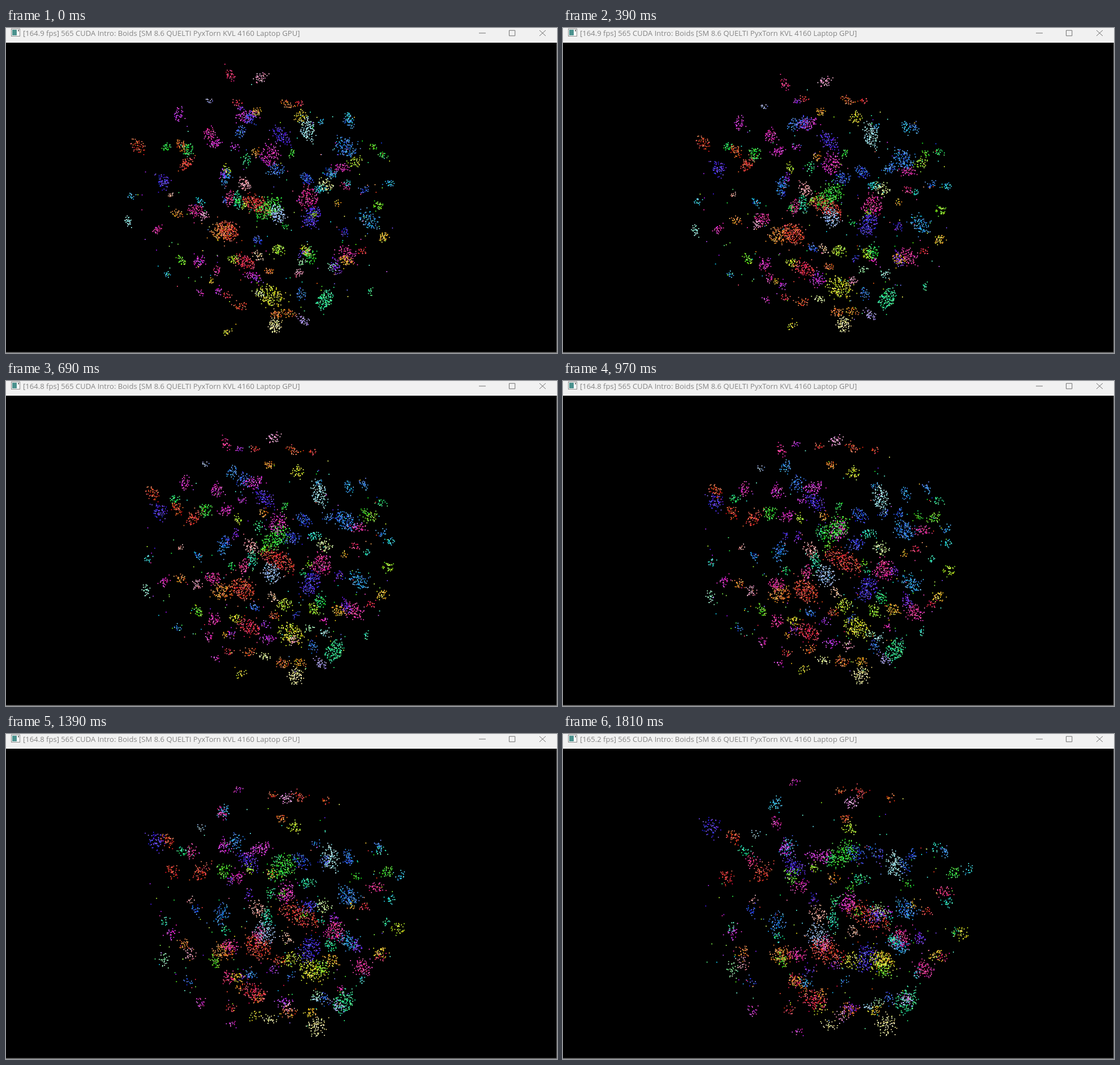
Recreate the animation shown at these times as an HTML page with a canvas. Size 974x575 px, loop 1.83 s.

```html
<!DOCTYPE html>
<html lang="en">
<head>
<meta charset="utf-8">
<title>Boids</title>
<style>
  html, body { margin: 0; width: 100%; height: 100%; overflow: hidden; background: #000; }
  canvas { position: absolute; left: 0; top: 0; width: 974px; height: 575px; }
  #title {
    position: absolute; left: 30px; top: 0; line-height: 18px; white-space: pre;
    font-family: "Open Sans", "Noto Sans", sans-serif; font-size: 13.05px; color: #858585;
  }
</style>
</head>
<body>
<canvas id="stage" width="974" height="575"></canvas>
<div id="title"></div>
<script>
const W = 974, H = 575, LOOP = 1830, LAST = 1810;
const STEPS = [0, 120, 260, 390, 540, 690, 840, 970, 1120, 1270, 1390, 1540, 1690, LAST];
const SWARM = { x: 466, y: 311, rx: 226, ry: 208 };
const SMALL_FLOCKS = 92, LONERS = 150, DOT = 1.75;

const ctx = document.getElementById('stage').getContext('2d');
const title = document.getElementById('title');
const flocks = [];

let seed = 565;
function rand() {
  seed = (seed + 0x6D2B79F5) | 0;
  let h = Math.imul(seed ^ (seed >>> 15), 1 | seed);
  h = (h + Math.imul(h ^ (h >>> 7), 61 | h)) ^ h;
  return ((h ^ (h >>> 14)) >>> 0) / 4294967296;
}
const spread = (r) => (rand() * 2 - 1) * r;
const mix = (a, b, u) => a + (b - a) * u;

// Boids keep their distance: a jittered spiral, squeezed and tilted, with a ragged edge
function makeBoids(size, pale) {
  const squeeze = Math.exp(spread(0.3)), tilt = rand() * Math.PI, lobe = rand() * 6.3;
  const cos = Math.cos(tilt), sin = Math.sin(tilt);
  return Array.from({ length: size }, (_, k) => {
    const a = k * 2.39996 + spread(0.4);
    const stray = rand() < 0.2 ? rand() * 0.8 : 0;
    const r = 1.5 * Math.sqrt(k + 0.5) * (1 + 0.25 * Math.sin(2 * a + lobe) + stray);
    const px = Math.cos(a) * r * squeeze, py = Math.sin(a) * r / squeeze;
    return {
      x: px * cos - py * sin + spread(1.3),
      y: px * sin + py * cos + spread(1.3),
      dx: spread(6), dy: spread(6),
      hue: spread(16),
      light: (pale ? 82 : 60) + spread(11)
    };
  });
}

function addFlock(hue, size, x0, y0, x1, y1, pale = false, turn = 0) {
  flocks.push({ hue, turn, x0, y0, x1, y1, grow: spread(0.35), boids: makeBoids(size, pale) });
}

// The big flocks: hue, size, start and end
addFlock(4, 62, 318, 239, 352, 244);
addFlock(10, 45, 232, 208, 300, 182);
addFlock(248, 60, 277, 271, 261, 165);
addFlock(300, 70, 424, 155, 457, 216);
addFlock(310, 100, 465, 224, 503, 298);
addFlock(250, 85, 486, 190, 408, 233);
addFlock(185, 110, 532, 178, 585, 232, true);
addFlock(212, 120, 600, 210, 605, 310);
addFlock(325, 120, 533, 299, 595, 361);
addFlock(248, 130, 540, 333, 535, 395);
addFlock(2, 190, 443, 312, 540, 322);
addFlock(120, 170, 464, 318, 495, 212);
addFlock(6, 170, 391, 358, 460, 381);
addFlock(26, 100, 380, 360, 385, 390);
addFlock(212, 65, 388, 262, 378, 335);
addFlock(64, 150, 467, 473, 561, 402);
addFlock(58, 80, 474, 526, 571, 513, true);
addFlock(152, 125, 563, 480, 607, 471);
addFlock(350, 110, 421, 413, 442, 470);
addFlock(215, 110, 480, 328, 450, 357, true);
addFlock(322, 60, 335, 322, 413, 390);
addFlock(322, 80, 602, 400, 638, 415);
addFlock(205, 85, 640, 340, 594, 374);

// A place in the swarm, denser towards the middle; out is 0 at the centre and 1 at the rim
function place() {
  const out = Math.pow(rand(), 0.56), a = rand() * 2 * Math.PI;
  return { out, x: SWARM.x + SWARM.rx * out * Math.cos(a), y: SWARM.y + SWARM.ry * out * Math.sin(a) };
}
function room(p) {
  return Math.min(...flocks.map((f) => Math.hypot((f.x0 + f.x1) / 2 - p.x, (f.y0 + f.y1) / 2 - p.y)));
}

// Small flocks fill the free room, larger near the middle, each on its own heading
for (let i = 0; i < SMALL_FLOCKS; i++) {
  const p = [place(), place(), place()].sort((a, b) => room(b) - room(a))[0];
  const size = Math.round(10 + (65 - 35 * p.out) * Math.pow(rand(), 1.3));
  const vx = 12 + spread(32), vy = 4 + spread(34);
  addFlock(rand() * 360, size, p.x - vx, p.y - vy, p.x + vx, p.y + vy, rand() < 0.14, spread(50));
}
for (let i = 0; i < LONERS; i++) {
  const p = place(), vx = spread(25), vy = spread(25);
  addFlock(rand() * 360, 1, p.x - vx, p.y - vy, p.x + vx, p.y + vy);
}

function drawFlock(f, u) {
  const cx = mix(f.x0, f.x1, u), cy = mix(f.y0, f.y1, u);
  const scale = 1 + f.grow * (u - 0.5);
  for (const b of f.boids) {
    ctx.fillStyle = `hsl(${f.hue + f.turn * u + b.hue}, 88%, ${b.light}%)`;
    ctx.fillRect(cx + b.x * scale + b.dx * u, cy + b.y * scale + b.dy * u, DOT, DOT);
  }
}

function drawWindow() {
  ctx.fillStyle = '#f1f1f1';
  ctx.fillRect(0, 0, W, 26);
  ctx.fillStyle = '#777';
  ctx.fillRect(0, 573.5, W, 1.5);
  ctx.fillRect(973, 26, 1, H - 26);

  ctx.fillStyle = '#fff';
  ctx.fillRect(9, 1, 16, 14);
  ctx.strokeStyle = '#888';
  ctx.lineWidth = 1;
  ctx.strokeRect(9.5, 1.5, 15, 13);
  ctx.fillStyle = '#4b918d';
  ctx.fillRect(11, 3, 8, 10);
  ctx.fillStyle = '#777';
  ctx.fillRect(21, 3, 2, 3);

  ctx.strokeStyle = '#707070';
  ctx.beginPath();
  ctx.moveTo(836, 9);
  ctx.lineTo(848, 9);
  ctx.rect(889.5, 4.2, 10.3, 9.6);
  ctx.moveTo(943, 4);
  ctx.lineTo(954, 14);
  ctx.moveTo(954, 4);
  ctx.lineTo(943, 14);
  ctx.stroke();
}

function draw(t) {
  ctx.fillStyle = '#000';
  ctx.fillRect(0, 0, W, H);
  for (const f of flocks) drawFlock(f, t / LAST);
  drawWindow();
  const fps = t < 540 ? '164.9' : t < 1540 ? '164.8' : '165.2';
  title.textContent = `[${fps} fps] 565 CUDA Intro: Boids [SM 8.6 QUELTI PyxTorn KVL 4160 Laptop GPU]`;
}

let shown = -1;
const start = performance.now();
function tick() {
  const now = (performance.now() - start) % LOOP;
  const t = STEPS.filter((s) => s <= now).pop();
  if (t !== shown) draw(shown = t);
  requestAnimationFrame(tick);
}
tick();
</script>
</body>
</html>
```
